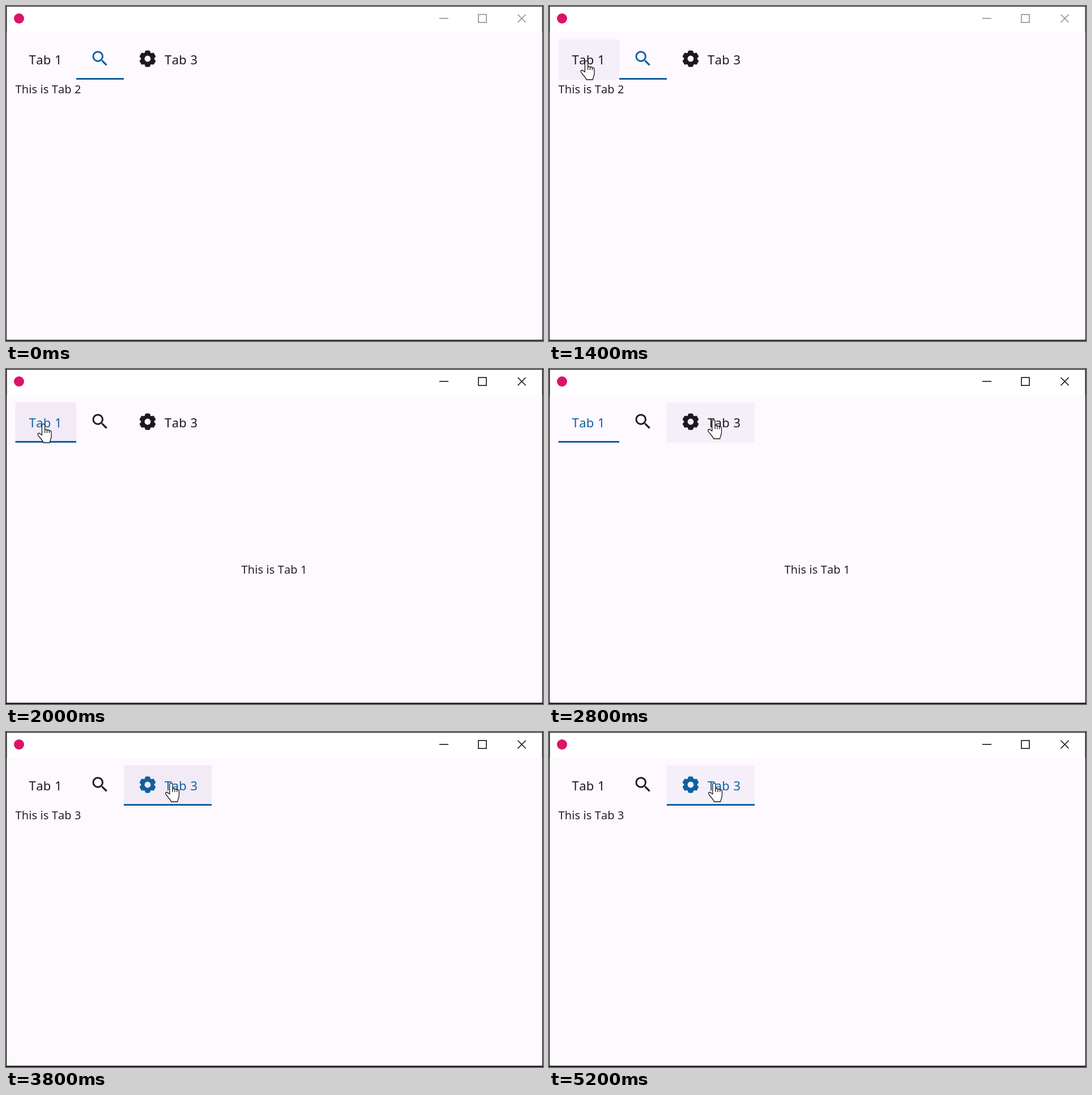
These frames come from a looping animation (948 by 591 pixels, 5.4 s). An HTML page:

```html
<!DOCTYPE html>
<html lang="en">
<head>
<meta charset="utf-8">
<title>Tabs</title>
<style>
  html, body { margin: 0; width: 100%; height: 100%; overflow: hidden; background: #1c1a1e; }
  svg { display: block; width: 948px; height: 591px; }
  text { font-family: "Noto Sans", "Open Sans", sans-serif; font-kerning: none; }
  .label { font-size: 22px; letter-spacing: .4px; }
  .page { font-size: 20px; letter-spacing: .1px; fill: #242227; }
  .controls { fill: none; stroke-width: 1.6; }
  .hand, .arrow { fill: #fff; stroke: #17161a; stroke-width: 1.3; stroke-linejoin: round; }
</style>
</head>
<body>
<svg viewBox="0 0 948 591">
  <defs>
    <clipPath id="inside"><rect x="2" y="46" width="944" height="542"/></clipPath>
    <path id="tooth" d="M-5.6-8.6-3.4-14H3.4L5.6-8.6Z" fill="currentColor" stroke="currentColor" stroke-linejoin="round"/>
  </defs>

  <rect id="frame" width="948" height="591"/>
  <rect x="1.5" y="1.2" width="945" height="587.3" fill="#fff"/>
  <rect x="1.5" y="46" width="945" height="542.5" fill="#fef8ff"/>
  <circle cx="23" cy="22" r="9" fill="#dc1466"/>
  <g id="controls" class="controls">
    <path d="M765 21.8h16"/>
    <rect x="834" y="15" width="14" height="14"/>
    <path d="M903.5 15l14 14m0-14l-14 14"/>
  </g>

  <rect id="hover" y="59" height="71" fill="#f5eff9"/>
  <rect id="press" y="58" height="72" rx="4" fill="#e6e0e9"/>
  <rect id="bar" y="127" height="3" fill="#0f609f"/>

  <g class="tab"><text class="label" x="40.5" y="103" fill="currentColor">Tab 1</text></g>
  <g class="tab">
    <path transform="translate(148 74.7) scale(1.5)" fill="currentColor" d="M15.5 14h-.79l-.28-.27A6.47 6.47 0 0 0 16 9.5 6.5 6.5 0 1 0 9.5 16c1.61 0 3.09-.59 4.23-1.57l.27.28v.79l5 4.99L20.49 19l-4.99-5zm-6 0C7.01 14 5 11.99 5 9.5S7.01 5 9.5 5 14 7.01 14 9.5 11.99 14 9.5 14z"/>
  </g>
  <g class="tab">
    <g transform="translate(250 93)">
      <circle r="8.1" fill="none" stroke="currentColor" stroke-width="5.4"/>
      <g id="teeth"></g>
    </g>
    <text class="label" x="280" y="103" fill="currentColor">Tab 3</text>
  </g>

  <g clip-path="url(#inside)">
    <text class="page" y="361">This is Tab 1</text>
    <text class="page" y="154">This is Tab 2</text>
    <text class="page" y="154">This is Tab 3</text>
  </g>

  <circle id="dot" r="12" fill="#e0426f" fill-opacity=".48" stroke="#b8446b" stroke-opacity=".75" stroke-dasharray="3 2"/>
  <path id="arrow" class="arrow" d="M0 0V25l5.7-5.4 3.8 8.6 4-1.7-3.8-8.4h7.8Z"/>
  <g id="hand" class="hand">
    <path d="M8.4 20.5V3.5a2.6 2.6 0 0 1 5.2 0V12c0-2 3.9-2 3.9.6 0-1.7 3.9-1.5 3.9.9 0-1.4 3.6-1.1 3.6 1.7V23c0 4.5-2.2 6-2.7 11H11c-.6-3.4-6.4-8.4-9.3-13.2-1.6-3 1.5-4.6 3.5-2.6Z"/>
    <path fill="none" d="M13.6 12v5m3.9-4.5v4.5m3.9-3.5v3.5"/>
  </g>
</svg>
<script>
  const LOOP = 5400, STEP = 200, PAGE = 914;
  const EDGES = [16.5, 124, 208, 363];
  const HOME = [415.5, 16.5, 16.5];
  const INK = [28, 26, 31], ACCENT = [13, 97, 160];

  const moves = [
    { at: 1600, from: 1, to: 0, dot: [66, 97] },
    { at: 3400, from: 0, to: 2, dot: [290.5, 89] }
  ];
  // Pointer stops: time, left, top
  const stops = [
    [600, 622, 108], [800, 225, 46], [1000, 80, 78], [1200, 57, 97], [1400, 55, 96],
    [2400, 130, 91], [2600, 266, 88], [2800, 279.5, 89], [3400, 280.5, 89]
  ];
  const SLIDE = [.576, .999], FADE = [1, .6, .25];

  const $ = id => document.getElementById(id);
  const tabs = document.querySelectorAll('.tab');
  const pages = document.querySelectorAll('.page');
  const mix = (a, b, p) => a + (b - a) * p;
  const set = (el, attrs) => { for (const k in attrs) el.setAttribute(k, attrs[k]); };
  const show = (el, on) => { el.style.display = on ? '' : 'none'; };

  for (let i = 0; i < 6; i++)
    $('teeth').insertAdjacentHTML('beforeend', `<use href="#tooth" transform="rotate(${i * 60})"/>`);

  function edge(pos) {
    const i = Math.min(2, Math.floor(pos));
    return mix(EDGES[i], EDGES[i + 1], pos - i);
  }

  function barRight(pos) {
    const i = Math.min(1, Math.floor(pos));
    return mix(EDGES[i + 1], EDGES[i + 2], pos - i);
  }

  function cover(el, tab) {
    set(el, { x: EDGES[tab], width: EDGES[tab + 1] - EDGES[tab] });
  }

  function draw(t) {
    const move = moves.findLast(m => t >= m.at) || { at: -LOOP, from: 1, to: 1 };
    const age = (t - move.at) / STEP;
    const p = SLIDE[age] ?? 1;
    const focused = t >= moves[0].at;

    $('frame').setAttribute('fill', focused ? '#1c1a1e' : '#343236');
    $('controls').setAttribute('stroke', focused ? '#111' : '#918e94');

    const pos = mix(move.from, move.to, p), left = edge(pos);
    set($('bar'), { x: left, width: barRight(pos) - left });

    const dir = Math.sign(move.to - move.from);
    tabs.forEach((tab, i) => {
      const lit = i === move.to ? p : i === move.from ? 1 - p : 0;
      tab.style.color = `rgb(${INK.map((c, k) => Math.round(mix(c, ACCENT[k], lit)))})`;
      const shift = i === move.to ? dir * (1 - p) : -dir * p;
      show(pages[i], i === move.to || (i === move.from && p < 1));
      pages[i].setAttribute('x', HOME[i] + PAGE * shift);
    });

    const stop = stops.findLast(s => t >= s[0]);
    const onTab = t >= 1000;
    show($('arrow'), stop && !onTab);
    show($('hand'), onTab);
    show($('hover'), onTab);
    if (stop) {
      const [, x, y] = stop;
      set($(onTab ? 'hand' : 'arrow'), { transform: `translate(${x} ${y})` });
      if (onTab) cover($('hover'), [124, 208].filter(e => x + 10 >= e).length);
    }

    cover($('press'), move.to);
    $('press').setAttribute('opacity', FADE[age] ?? 0);
    show($('dot'), age === 0);
    if (move.dot) set($('dot'), { cx: move.dot[0], cy: move.dot[1] });
  }

  const start = performance.now();
  function tick() {
    const t = (performance.now() - start) % LOOP;
    draw(Math.floor(t / STEP) * STEP);
    requestAnimationFrame(tick);
  }
  tick();
</script>
</body>
</html>
```
